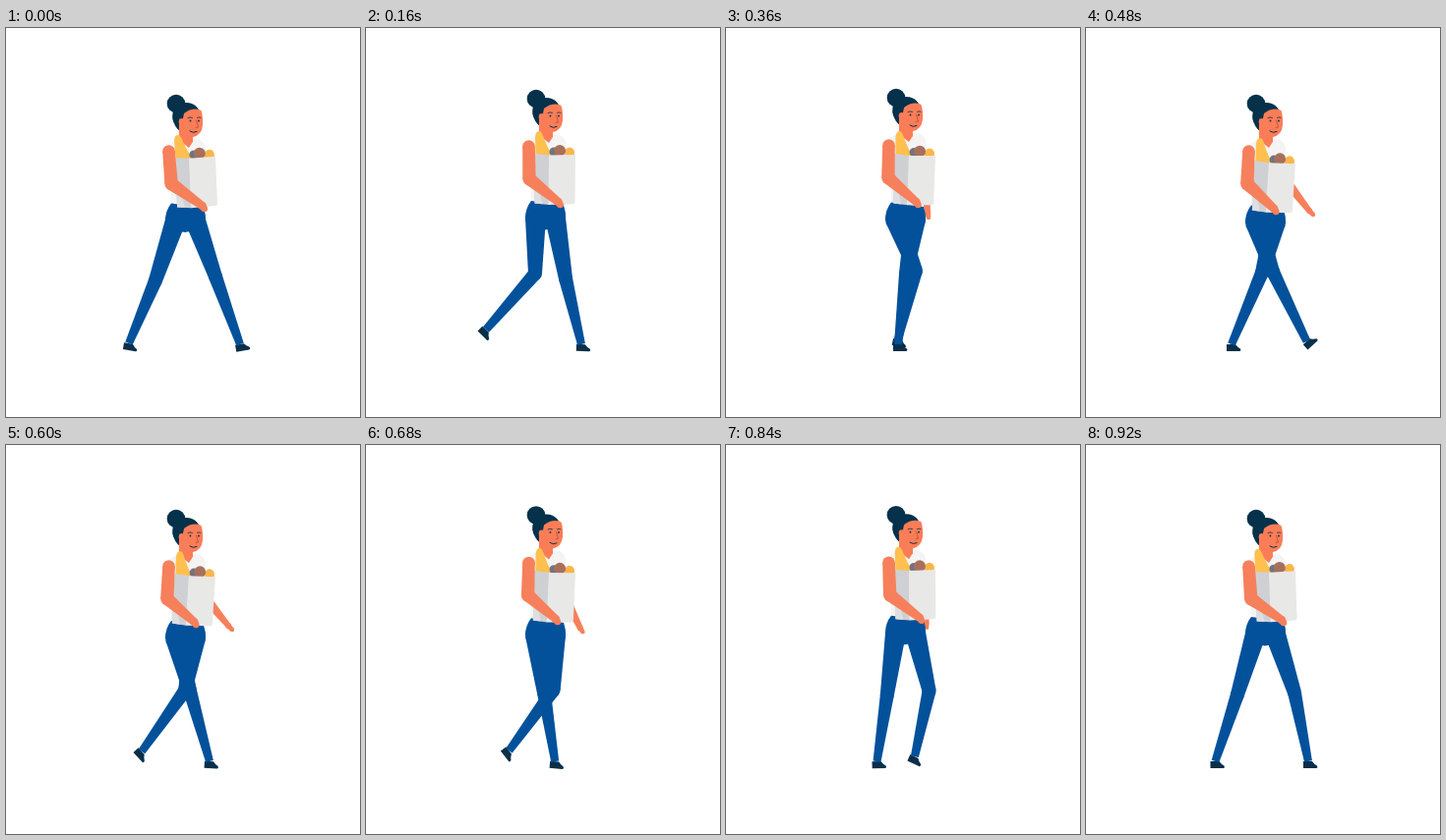
Animation of 360x396 px, one loop 0.96 s. Source, as an HTML page with a canvas:

```html
<!DOCTYPE html>
<html lang="en">
<head>
<meta charset="utf-8">
<title>Walking with groceries</title>
<style>
  html, body { margin: 0; width: 100%; height: 100%; overflow: hidden; background: #fff; }
  canvas { display: block; width: 360px; height: 396px; }
</style>
</head>
<body>
<canvas id="stage"></canvas>
<script>
const W = 360, H = 396, LOOP = 960, STEP = 40;
const SKIN = '#f6805b', FACE = '#fb7d58', HAIR = '#06314a', JEANS = '#03519b', SHOE = '#0b2f49';

// Rows: time, then values
const torso = [ // head dy, hip dy, bag y, bag tilt
  [0, 0, 0, 132, -3],
  [160, -5, -2.5, 128, 0],
  [260, -8, -4, 126, 0.7],
  [360, -6, -1, 128, 1.5],
  [480, 0, 2, 135, 3],
  [600, -2, 0.5, 131, 3],
  [760, -8, -4.5, 126, 0.5],
  [920, -2, -3.5, 129, -2.5]
];
const farHand = [
  [0, 200, 179], [160, 200, 178], [360, 206, 193], [480, 231, 190],
  [600, 230, 188], [760, 210, 191], [920, 200, 179]
];
// Knee x, y, ankle x, y, foot angle
const rightLeg = [
  [0, 213, 253, 238, 322, -10],
  [160, 203, 255, 219, 322, 2],
  [360, 183, 250, 175, 322, 0],
  [480, 179, 249, 148, 322, 0],
  [600, 182, 250, 138, 312, 47],
  [760, 200, 249, 162, 313, 45],
  [920, 212, 252, 226, 322, 0]
];
const leftLeg = [
  [0, 152, 257, 125, 321, 10],
  [160, 172, 250, 122, 307, 45],
  [360, 193, 247, 175, 317, 12],
  [480, 190, 248, 224.5, 319, -42],
  [600, 187, 250, 207, 322, 4],
  [760, 173.5, 255, 175, 322, 0],
  [920, 154, 254, 131.5, 322, 0]
];

const canvas = document.getElementById('stage');
const c = canvas.getContext('2d');
const dpr = window.devicePixelRatio || 1;
canvas.width = W * dpr;
canvas.height = H * dpr;

// Smooth periodic interpolation of a track
function sample(track, t) {
  const n = track.length;
  const row = i => track[(i + n) % n];
  const time = i => row(i)[0] + Math.floor(i / n) * LOOP;
  let i = n - 1;
  while (track[i][0] > t) i--;
  const span = time(i + 1) - time(i), u = (t - time(i)) / span;
  return row(i).slice(1).map((a, k) => {
    const v = j => row(j)[k + 1];
    const slope = j => (v(j + 1) - v(j - 1)) / (time(j + 1) - time(j - 1)) * span;
    const b = v(i + 1), m0 = slope(i), m1 = slope(i + 1);
    return a + u * (m0 + u * (3 * (b - a) - 2 * m0 - m1 + u * (2 * (a - b) + m0 + m1)));
  });
}

function fill(color, d) {
  c.fillStyle = color;
  c.fill(new Path2D(d));
}

function oval(color, x, y, rx, ry = rx) {
  c.fillStyle = color;
  c.beginPath();
  c.ellipse(x, y, rx, ry, 0, 0, 2 * Math.PI);
  c.fill();
}

function line(color, width, d) {
  c.strokeStyle = color;
  c.lineWidth = width;
  c.lineCap = 'round';
  c.stroke(new Path2D(d));
}

function at(x, y, deg, draw) {
  c.save();
  c.translate(x, y);
  c.rotate(deg * Math.PI / 180);
  draw();
  c.restore();
}

// Tapered limb through [x, y, radius] joints
function limb(color, joints, capLast = true) {
  joints.forEach(([x, y, r], i) => {
    if (capLast || i < joints.length - 1) oval(color, x, y, r);
    if (!i) return;
    const [px, py, pr] = joints[i - 1];
    const len = Math.hypot(x - px, y - py) || 1;
    const nx = (py - y) / len, ny = (x - px) / len;
    c.beginPath();
    c.moveTo(px + nx * pr, py + ny * pr);
    c.lineTo(x + nx * r, y + ny * r);
    c.lineTo(x - nx * r, y - ny * r);
    c.lineTo(px - nx * pr, py - ny * pr);
    c.fill();
  });
}

function leg(track, t, hipX, hipY) {
  const [kx, ky, ax, ay, foot] = sample(track, t);
  at(ax, ay, foot, () => fill(SHOE, 'M-5 0L4 0Q6 3 9 4.5Q10 7 8 7L-5 7Z'));
  limb(JEANS, [[hipX, hipY, 10.5], [kx, ky, 7], [ax, ay, 4]], false);
}

function head() {
  oval(HAIR, 173, 77, 9.3);
  oval(HAIR, 183.5, 90, 14.3, 14);
  fill(HAIR, 'M169.5 91Q171 101 177 105L184 90Z');
  fill(FACE, 'M176 97L190 106L190 116L186 122L176 114Z');
  fill(FACE, 'M181 87Q190 80 198.500 84Q200.500 90 200 99Q199 109 190 111Q181 111 178 102Z');
  oval(FACE, 178.5, 95.5, 2.8, 3.4);
  oval(HAIR, 187.5, 94.5, 0.9);
  oval(HAIR, 196, 94.5, 0.9);
  line(HAIR, 0.8, 'M185 91.500Q187 90.300 189.500 91.300M194.500 91.300Q196.500 90.300 198 91.300');
  line('#b9523c', 0.9, 'M193.500 94L195.500 101L193 101.500');
  line(HAIR, 1, 'M187 105Q190 107.500 194 105.500');
}

function bag() {
  fill('#ffc04f', 'M1 2L.5 -17Q1 -24 5.500 -23Q8 -21 10 -14Q13 -7 18 2Z');
  oval('#6f7480', 19.5, -2, 4.5);
  oval('#fbb64a', 35.5, -1, 5, 5.5);
  oval('#a8705c', 25.5, -3, 6);
  fill('#cfd0d4', 'M0 0L15 1.500L14.500 52L0 50.500Z');
  fill('#dedfe1', 'M0 18L8 51.300L0 50.500Z');
  fill('#e8e8e7', 'M14.500 1.500L41.500 1L41 49Q41 51 39 51.200L14 52Z');
}

function draw(t) {
  const [headY, hipY, bagY, tilt] = sample(torso, t);
  const [fx, fy] = sample(farHand, t);

  c.setTransform(dpr, 0, 0, dpr, 0, 0);
  c.fillStyle = '#fff';
  c.fillRect(0, 0, W, H);

  const reach = (fx - 200) / 31;
  limb(SKIN, [[201 + 8 * reach, 163, 4.5], [fx - 4 * reach, fy - 4, 2.9], [fx, fy, 2.2]]);

  at(0, headY, 0, () =>
    fill('#f4f4f4', 'M165 119L177 112L188 121L191 113Q200 112 203 121L203 184L168 184Z'));

  leg(leftLeg, t, 172.5, 196 + hipY);
  leg(rightLeg, t, 192.5, 196 + hipY);
  at(0, hipY, 0, () =>
    fill(JEANS, 'M168 178.500L201 183Q203.500 190 203 197L192 206L182 208L172 206L162 196Q162 186 168 178.500Z'));

  at(0, headY, 0, head);
  at(171.5, bagY, tilt, bag);

  const hx = 197.5 - 1.4 * tilt, hy = bagY + 52;
  limb(SKIN, [
    [165.5, 125.5 + headY, 6.3],
    [166 - 0.7 * tilt, 158.5 + headY, 6.7],
    [hx - 2, hy - 3, 4],
    [hx, hy, 3.3]
  ]);
}

const start = performance.now();
function tick() {
  const t = (performance.now() - start) % LOOP;
  draw(Math.floor(t / STEP) * STEP);
  requestAnimationFrame(tick);
}
tick();
</script>
</body>
</html>
```
